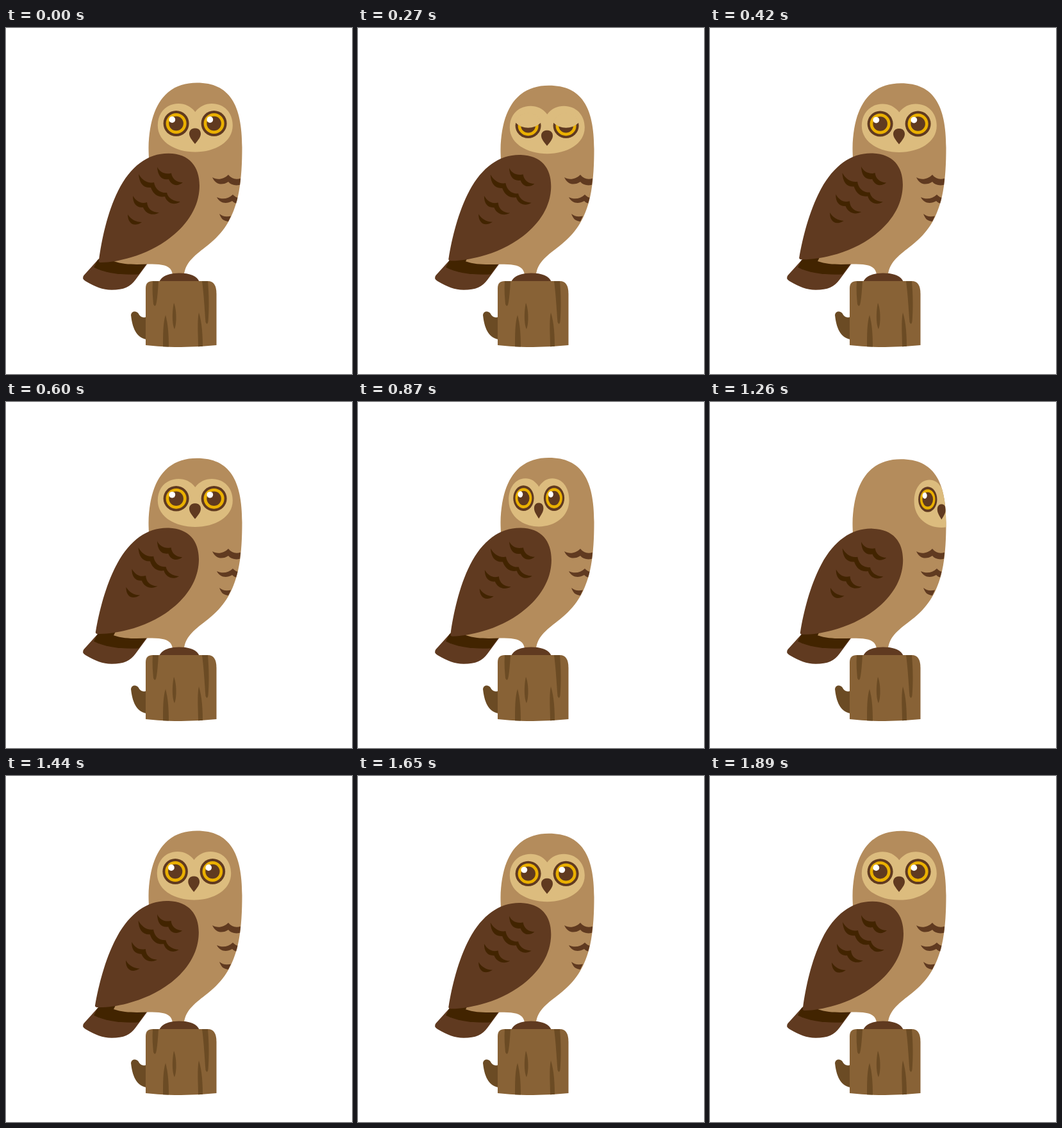
These frames come from a looping animation (540 px wide and 540 px high, 1920 ms). An HTML page:

```html
<!DOCTYPE html>
<html lang="en">
<head>
<meta charset="utf-8">
<title>Owl on a stump</title>
<style>
  html, body { margin: 0; width: 100%; height: 100%; overflow: hidden; background: #fff; }
  svg { display: block; width: 100vw; height: 100vh; }
  .brown { fill: #603a20; }
  .dark { fill: #422400; }
  .tan { fill: #b48c5c; }
  .cream { fill: #dcbc7e; }
  .wood { fill: #886236; }
  .bark { fill: #6b4b24; }
</style>
</head>
<body>
<svg viewBox="0 0 540 540">
  <defs>
    <path id="torso" d="M298 85.5C349 85.5 368.5 120 368.5 186C368.5 216 367 244 360.500 269C352 299 340 319 315 339C296 354 280 365 278 385L260 385C258 370 245 368.5 222 368.5C205 369 185 370 168 364L200 300L223 205C223 200 222.5 195 222.5 187C224 120 250 85.5 298 85.5Z"/>
    <clipPath id="inTorso"><use href="#torso"/></clipPath>
    <clipPath id="inEye"><circle r="20.6"/></clipPath>
    <g id="eye">
      <circle class="brown" r="20"/>
      <circle r="16" fill="#eab000"/>
      <circle class="brown" r="11.3"/>
      <circle cx="-6.3" cy="-6" r="4.9" fill="#fff"/>
      <g clip-path="url(#inEye)"><circle id="lid" class="cream" r="28"/></g>
    </g>
  </defs>

  <path class="brown" d="M145 360L121.5 386Q117.5 391 124 395C140 404 150 408.7 165 408.7C184 408.7 194 404 202 393L222 366Z"/>
  <path class="dark" d="M143 362L137 373.5C152 382 180 386 207 384.5L220 367L160 355Z"/>

  <g id="bird">
    <use href="#torso" class="tan"/>
    <g clip-path="url(#inTorso)">
      <g id="face">
        <path class="cream" d="M0 131C-7 122-16 118-26 118C-45 118-58.5 132-58.5 152C-58.5 178-31 193.5 0 193.5C31 193.5 58.5 178 58.5 152C58.5 132 45 118 26 118C16 118 7 122 0 131Z"/>
        <use href="#eye" transform="translate(-29.7 149)"/>
        <use href="#eye" transform="translate(29.3 149)"/>
        <path class="brown" d="M-.3 181C-5 175-9.3 170-9.3 165C-9.3 159-5 156.5-.3 156.5C4.7 156.5 8.7 159 8.7 165C8.7 170 4.7 175-.3 181Z"/>
      </g>
    </g>
    <g id="wing">
      <path class="brown" d="M145 362C149 332 158 288 175 254C194 216 221 195.7 253 195.7C286 195.7 302 216 302 246C302 300 250 342 195 358C178 363 162 366 148 366Q144 366 145 362Z"/>
      <g class="dark">
        <path d="M236 217C237 231 243 238 254 236C258 246 268 248 276 241C266 241 259 235 258 226.5C248 229 240 225 236 217Z"/>
        <path d="M207 228C208 242 214 250 226 249C230 260 238 265 248 263C251 273 262 278 272 271C262 271 253 266 251 257C241 258 233 252 231 241C221 243 212 237 207 228Z"/>
        <path d="M198 262C198 274 204 281 214 280C218 290 229 294 239 288C229 288 221 283 220 272C210 275 203 270 198 262Z"/>
        <path d="M190 291C190 304 199 312 212 303C203 303 195 299 190 291Z"/>
      </g>
    </g>
  </g>

  <g class="brown" clip-path="url(#inTorso)">
    <path d="M322 233C330 238 340 236 347 229C352 235 358 237 366 234.8L365.5 244.7C358 246.5 351 245 347 240C338 246 327 245 322 233Z"/>
    <path d="M329 264C337 268 347 267 354 260C357 263 360 265 364 265L360 274C357 273 355 272 353 270C344 275 334 274 329 264Z"/>
    <path d="M333 290C338 294 343 295 351 293.5L347 302C339 301 336 298 333 290Z"/>
  </g>

  <path class="brown" d="M239 397C242 387 255 382.5 270 382.5C287 382.5 299 387 302 397Z"/>
  <path class="bark" d="M219 451C213 453 209 450 207 446C204 441 196 441 195 448C197 467 203 483 219 486Z"/>
  <path class="wood" d="M218 495V406Q218 395 229 395H315Q328.5 395 328.5 415V495Q273 501 218 495Z"/>
  <g class="bark">
    <path d="M229 395H238C237 410 236 425 234 432Q232 436 230 431C229 420 228 408 229 395Z"/>
    <path d="M306 395H315C317 420 317 440 315.5 458Q314 465 311.5 459C310 440 309 418 306 395Z"/>
    <path d="M262 429C266 438 267 460 263 470C259 463 259 442 262 429Z"/>
    <path d="M249 448C253 462 254 480 254 497.6L245 497.3C245 480 245 460 249 448Z"/>
    <path d="M301 444C306 460 307 480 307 496.8L300 497.2C300 480 298 458 301 444Z"/>
  </g>
</svg>
<script>
const LOOP = 1920, STEP = 30;
const [bird, face, wing, lid] = ['bird', 'face', 'wing', 'lid'].map(id => document.getElementById(id));

const clamp = x => Math.max(0, Math.min(1, x));
const ramp = (t, from, to) => clamp((t - from) / (to - from));
const smooth = u => u * u * (3 - 2 * u);
const wave = (t, period) => (1 - Math.cos(2 * Math.PI * t / period)) / 2;

// The head spins once: out on the left, in from the right, with a slight overshoot.
function faceShift(t) {
  if (t < 1125) return -125 * ramp(t, 780, 1060) ** 2;
  if (t < 1418) return 125 * (1 - ramp(t, 1201, 1418)) ** 2;
  return -2 * Math.sin(Math.PI * ramp(t, 1418, 1478));
}

function draw(t) {
  const squash = 1 - 0.015 * wave(t, 480);
  bird.setAttribute('transform', `translate(0 ${383 * (1 - squash)}) scale(1 ${squash})`);

  wing.setAttribute('transform', `rotate(${2.3 * wave(t, 960)} 270 216)`);

  const shift = faceShift(t);
  const narrow = 1 - 0.27 * shift ** 2 / (shift ** 2 + 66);
  face.setAttribute('transform', `translate(${295.3 + shift} 0) scale(${narrow} 1)`);

  const closed = smooth(ramp(t, 150, 250)) - smooth(ramp(t, 290, 390));
  lid.setAttribute('cy', -50 + 25.5 * closed);
}

function tick(now) {
  draw(Math.floor((now % LOOP) / STEP) * STEP);
  requestAnimationFrame(tick);
}
draw(0);
requestAnimationFrame(tick);
</script>
</body>
</html>
```
